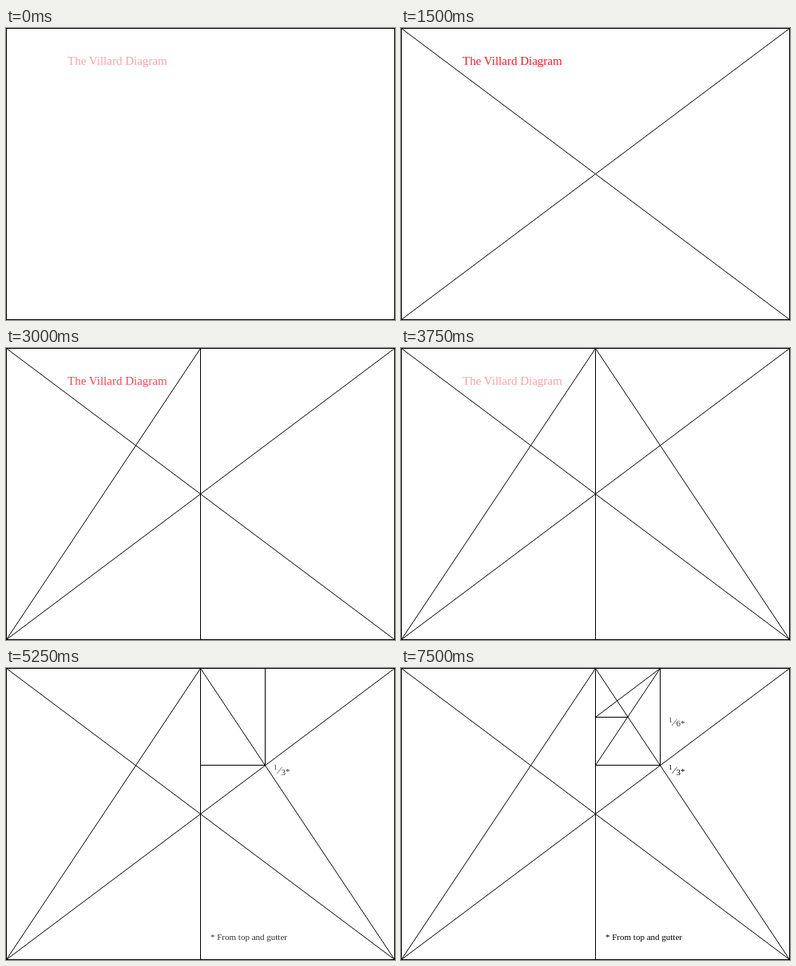
Animation of 487 by 365 pixels, one loop 8 s. Source, as an HTML page:

```html
<!DOCTYPE html>
<html lang="en">
<head>
<meta charset="utf-8">
<title>Page construction diagram</title>
<style>
  html, body { margin: 0; width: 100%; height: 100%; overflow: hidden; background: #fff; }
  svg { display: block; width: 487px; height: 365px; }
  path, rect { fill: none; stroke: #000; stroke-width: 1; }
  text { font-family: "Liberation Serif", serif; font-size: 11px; }
</style>
</head>
<body>
<svg viewBox="0 0 487 365">
  <rect x=".5" y=".5" width="486" height="364"/>

  <path data-step="1" d="M.5 364.5L486.5 .5"/>
  <path data-step="2" d="M.5 .5L486.5 364.5"/>
  <path data-step="3" d="M243.5 .5V364.5"/>
  <path data-step="4" d="M.5 364.5L243.5 .5"/>
  <path data-step="5" d="M243.5 .5L486.5 364.5"/>
  <path data-step="6" d="M243.5 121.5H324.5"/>
  <path data-step="7" d="M324.5 121.5V.5"/>
  <path data-step="8" d="M243.5 121.5L324.5 .5"/>
  <path data-step="9" d="M243.5 61.5H284.5"/>
  <path data-step="10" d="M243.5 61.5L324.5 .5"/>

  <text data-step="0" data-end="6" x="77" y="46" font-size="15" fill="#ed1c24" style="font-size:15px">The Villard Diagram</text>
  <text data-step="6" x="256" y="340">* From top and gutter</text>
  <text data-step="6"><tspan x="335" y="127" style="font-size:9px">1</tspan><tspan x="341.3" y="132" style="font-size:13px">⁄</tspan><tspan x="344.5" y="134">3</tspan><tspan x="350" y="133">*</tspan></text>
  <text data-step="9"><tspan x="335" y="68" style="font-size:9px">1</tspan><tspan x="341.3" y="72" style="font-size:13px">⁄</tspan><tspan x="344.5" y="73">6</tspan><tspan x="350" y="73">*</tspan></text>
</svg>
<script>
  const LOOP = 8000, STEP = 750;
  const FADE = [0, 0.4, 0.8, 1];
  const parts = [...document.querySelectorAll("[data-step]")].map(el => ({
    el,
    start: +el.dataset.step,
    end: +(el.dataset.end ?? Infinity),
    fades: el.tagName === "text"
  }));

  // Lines appear at once; text fades in and out in whole steps.
  function opacity({ start, end, fades }, step) {
    if (step < start) return 0;
    if (!fades) return 1;
    const level = Math.min(step - start + 1, end - step, 3);
    return FADE[Math.max(level, 0)];
  }

  function draw(now) {
    const step = Math.floor((now % LOOP) / STEP);
    for (const part of parts) part.el.style.opacity = opacity(part, step);
    requestAnimationFrame(() => draw(performance.now()));
  }
  draw(performance.now());
</script>
</body>
</html>
```
